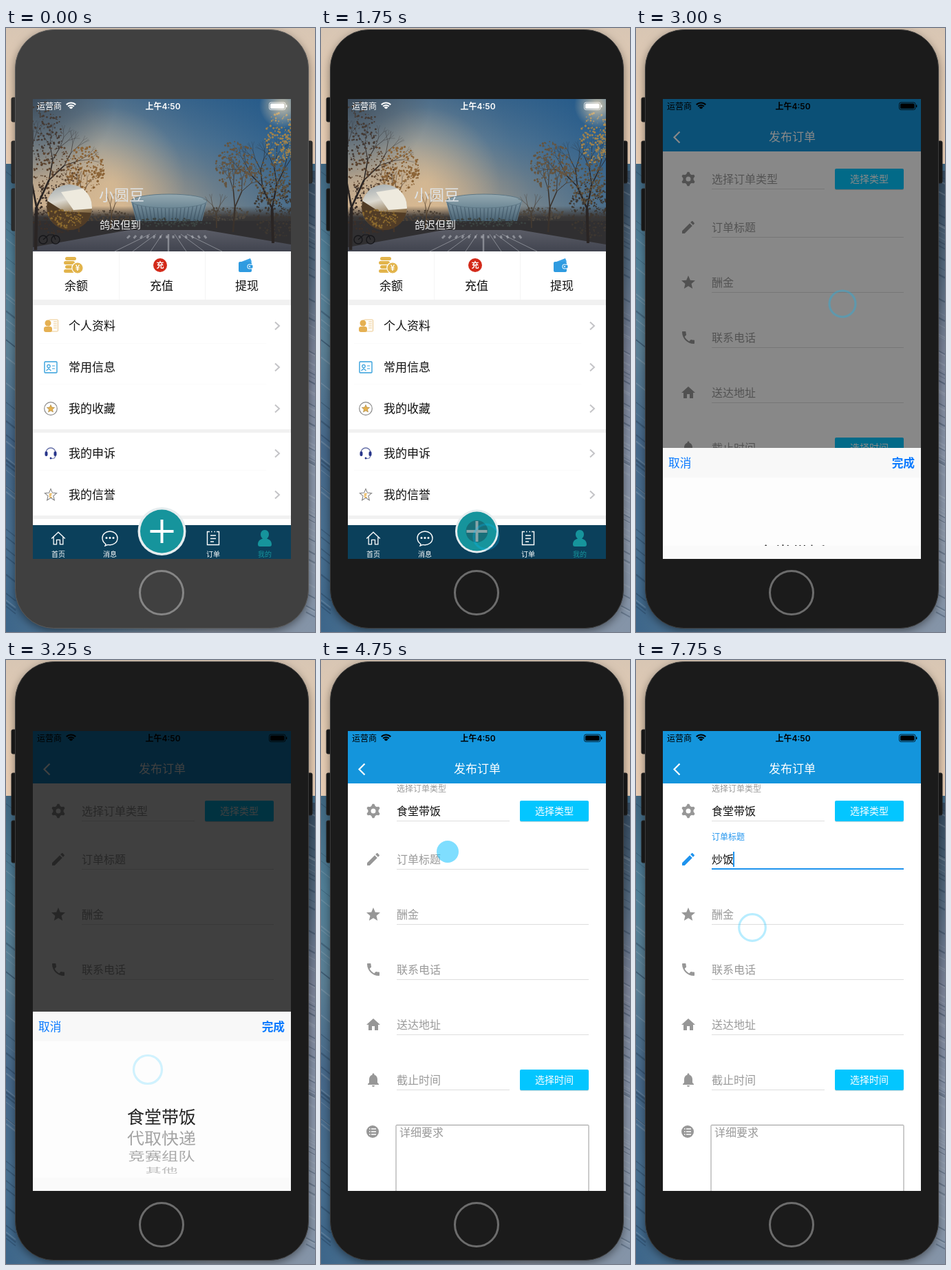
These frames come from a looping animation (449 by 876 pixels, 8 s). An HTML page with a canvas:

```html
<!DOCTYPE html>
<html lang="zh">
<head>
<meta charset="utf-8">
<style>
html, body { margin: 0; width: 100%; height: 100%; overflow: hidden; background: #476e86; }
canvas { display: block; }
</style>
</head>
<body>
<canvas id="stage" width="449" height="876"></canvas>
<script>
const ctx = document.getElementById('stage').getContext('2d');
const LOOP = 8000, STEP = 250;
const CJK = '"Noto Sans CJK SC", "Noto Sans CJK", sans-serif';
const LATIN = 'Inter, ' + CJK;
const SCREEN = [39, 103, 375, 667];
const TEAL = '#16949c', GREY = '#979797', BLUE = '#1e93ee', LINK = '#0a7aff';

// ---------- helpers ----------
function rect(x, y, w, h, fill) { ctx.fillStyle = fill; ctx.fillRect(x, y, w, h); }

function round(x, y, w, h, r, fill, stroke, lw = 1) {
  ctx.beginPath();
  ctx.roundRect(x, y, w, h, r);
  paint(fill, stroke, lw);
}

function paint(fill, stroke, lw = 1) {
  if (fill) { ctx.fillStyle = fill; ctx.fill(); }
  if (stroke) { ctx.strokeStyle = stroke; ctx.lineWidth = lw; ctx.stroke(); }
}

function disc(x, y, r, fill, stroke, lw) {
  ctx.beginPath();
  ctx.arc(x, y, r, 0, Math.PI * 2);
  paint(fill, stroke, lw);
}

function line(pts, color, lw = 1) {
  ctx.beginPath();
  for (let i = 0; i < pts.length; i += 2) ctx.lineTo(pts[i], pts[i + 1]);
  paint(null, color, lw);
}

function poly(pts, fill) {
  ctx.beginPath();
  for (let i = 0; i < pts.length; i += 2) ctx.lineTo(pts[i], pts[i + 1]);
  ctx.closePath();
  paint(fill);
}

// y is the vertical middle of the glyphs
function text(s, x, y, size, color, { align = 'left', weight = 400, family = CJK } = {}) {
  ctx.font = `${weight} ${size}px ${family}`;
  ctx.textAlign = align;
  ctx.fillStyle = color;
  ctx.fillText(s, x, y + size * 0.38);
}

function shape(d, x, y, fill, stroke, lw, scale = 1) {
  ctx.save();
  ctx.translate(x - 12 * scale, y - 12 * scale);
  ctx.scale(scale, scale);
  const p = new Path2D(d);
  if (fill) { ctx.fillStyle = fill; ctx.fill(p, 'evenodd'); }
  if (stroke) { ctx.strokeStyle = stroke; ctx.lineWidth = lw / scale; ctx.stroke(p); }
  ctx.restore();
}

function gradient(x0, y0, x1, y1, ...colors) {
  const g = ctx.createLinearGradient(x0, y0, x1, y1);
  colors.forEach((c, i) => g.addColorStop(i / (colors.length - 1), c));
  return g;
}

function glow(x, y, r, rgb, a) {
  const g = ctx.createRadialGradient(x, y, 0, x, y, r);
  g.addColorStop(0, `rgba(${rgb},${a})`);
  g.addColorStop(1, `rgba(${rgb},0)`);
  rect(x - r, y - r, 2 * r, 2 * r, g);
}

function random(seed) {
  return () => (seed = (seed * 16807) % 2147483647) / 2147483647;
}

const ICON = {
  pencil: 'M3 17.25V21h3.75L17.81 9.94l-3.75-3.75zM20.71 7.04c.39-.39.39-1.02 0-1.41l-2.34-2.34c-.39-.39-1.02-.39-1.41 0l-1.83 1.83 3.75 3.75z',
  star: 'M12 17.27L18.18 21l-1.64-7.03L22 9.24l-7.19-.61L12 2 9.19 8.63 2 9.24l5.46 4.73L5.82 21z',
  phone: 'M6.62 10.79c1.44 2.83 3.76 5.14 6.59 6.59l2.2-2.2c.27-.27.67-.36 1.02-.24 1.12.37 2.33.57 3.57.57.55 0 1 .45 1 1V20c0 .55-.45 1-1 1C10.61 21 3 13.39 3 4c0-.55.45-1 1-1h3.5c.55 0 1 .45 1 1 0 1.25.2 2.45.57 3.57.11.35.03.74-.25 1.02z',
  home: 'M10 20v-6h4v6h5v-8h3L12 3 2 12h3v8z',
  bell: 'M12 22c1.1 0 2-.9 2-2h-4c0 1.1.9 2 2 2zm6-6v-5c0-3.07-1.64-5.64-4.5-6.32V4c0-.83-.67-1.5-1.5-1.5s-1.5.67-1.5 1.5v.68C7.63 5.36 6 7.92 6 11v5l-2 2v1h16v-1z',
  house: 'M2 12.5L12 3l10 9.5M5 10v11h4.5v-6.5h5V21H19V10',
  bubble: 'M6 20.5L5 23l4-1.6C17 23 23 18 23 12 23 6 18 2 12 2S1 6 1 11.5c0 4 2 7 5 9z',
  sheet: 'M7 2.5H3.5v19h17v-19H17M9 2.5h1.5M13.5 2.5H15M8 8h8M8 12.5h8M8 17h5',
  person: 'M12 0C8 0 6 3 6 6.5c0 3 1.5 5 3 6C4 14 2 17 2 21c0 2 1 3 3 3h14c2 0 3-1 3-3 0-4-2-7-7-8.5 1.5-1 3-3 3-6C18 3 16 0 12 0z'
};

function gear(x, y, color) {
  ctx.beginPath();
  for (let i = 0; i < 24; i++) {
    const a = (i - 0.5) / 24 * Math.PI * 2 + Math.PI / 6;
    const r = i % 4 < 2 ? 10.3 : 7.6;
    ctx.lineTo(x + r * Math.cos(a), y + r * Math.sin(a));
  }
  ctx.closePath();
  ctx.moveTo(x + 3.5, y);
  ctx.arc(x, y, 3.5, 0, Math.PI * 2, true);
  ctx.fillStyle = color;
  ctx.fill('evenodd');
}

// ---------- surroundings ----------
function wallpaper() {
  rect(0, 0, 449, 198, gradient(0, 0, 0, 198, '#d8c6b4', '#e3cbb2', '#e9cdb4'));
  rect(0, 197, 449, 679, gradient(0, 197, 0, 876, '#3f6681', '#517f97', '#5b7f95', '#46688a', '#486f90', '#3d668a'));
  rect(432, 207, 17, 669, gradient(0, 207, 0, 876, '#34495e', '#52687d', '#7c8499', '#8894a9', '#8e9aac', '#8494a8'));
  rect(0, 840, 449, 36, gradient(0, 0, 449, 0, 'rgba(61,102,138,1)', '#5f7e98', '#8a94a2', '#8494a8'));
  const rnd = random(77);
  for (let i = 0; i < 110; i++) {
    const y = 208 + rnd() * 640, w = 0.8 + rnd() * 1.6;
    const c = rnd() < 0.5 ? 'rgba(24,44,66,.3)' : 'rgba(185,195,205,.22)';
    if (i % 3) line([436, y, 449, y + 7], c, w);
    else line([0, y, 14, y + 11], c, w);
  }
}

function phone(active) {
  const side = active ? '#161616' : '#2b2b2b';
  const body = active ? '#1b1b1b' : '#404040';
  ctx.save();
  ctx.shadowColor = 'rgba(0,0,0,.5)';
  ctx.shadowBlur = 14;
  ctx.shadowOffsetY = 4;
  round(14, 3, 425, 867, 56, body);
  ctx.restore();
  for (const [y, h] of [[101, 35], [164, 61], [233, 61]]) round(8, y, 8, h, 2, side, '#222');
  round(437, 164, 8, 61, 2, side, '#222');
  round(13.5, 2.5, 426, 868, 56, body, active ? '#3c3c3c' : '#5a5a5a');
  disc(226, 819, 31.5, null, active ? '#6c6c6c' : '#858585', 3);
}

function statusBar(color) {
  text('运营商', 45, 113, 12, color);
  text('上午4:50', 228, 113, 12, color, { align: 'center', weight: 600, family: LATIN });
  [3, 6.5, 10].forEach((r, i) => {
    ctx.beginPath();
    ctx.arc(94.5, 118, r - 0.5, -Math.PI * 0.75, -Math.PI * 0.25);
    paint(null, color, i ? 2.2 : 3);
  });
  round(382.5, 108, 23.5, 10.5, 2.5, null, color, 0.8);
  round(384, 109.5, 20.5, 7.5, 1.5, color);
  rect(407, 111.5, 1.3, 3.5, color);
}

// ---------- home page ----------
function branch(x, y, a, len, w, rnd, color) {
  const x2 = x + Math.cos(a) * len, y2 = y + Math.sin(a) * len;
  line([x, y, x2, y2], color, w);
  if (len < 8) return;
  branch(x2, y2, a - 0.1 - rnd() * 0.35, len * 0.7, w * 0.6, rnd, color);
  branch(x2, y2, a + 0.1 + rnd() * 0.35, len * 0.7, w * 0.6, rnd, color);
}

function leaves(x, y, rx, ry, n, color, rnd) {
  for (let i = 0; i < n; i++) {
    const a = rnd() * 7, d = Math.sqrt(rnd());
    disc(x + Math.cos(a) * rx * d, y + Math.sin(a) * ry * d, 0.5 + rnd() * 1.2, color);
  }
}

function sky() {
  rect(39, 103, 375, 221, gradient(0, 103, 0, 285, '#56728a', '#7f8e97', '#b9a58c', '#d9b78f'));
  rect(39, 103, 375, 221, gradient(150, 200, 400, 110, 'rgba(24,84,138,0)', 'rgba(24,84,138,.5)', 'rgba(24,84,138,.8)'));
  glow(150, 225, 110, '232,198,152', 0.55);
  glow(39, 103, 120, '44,52,62', 0.6);
}

function stadium() {
  poly([182, 252, 292, 252, 284, 284, 190, 284], gradient(0, 250, 0, 284, '#809aa8', '#435c6c'));
  for (let i = 0; i < 19; i++) line([184 + i * 5.9, 254, 192 + i * 5, 282], 'rgba(45,66,82,.5)', 1.2);
  ctx.beginPath();
  ctx.ellipse(237, 251, 55, 10, 0, 0, Math.PI * 2);
  paint(gradient(0, 241, 0, 261, '#95a9b1', '#6d8896'), '#5d7785', 1);
}

function street(rnd) {
  rect(39, 258, 375, 34, gradient(0, 258, 0, 290, 'rgba(62,58,56,0)', '#3a3838', '#2d2e30'));
  leaves(320, 270, 34, 10, 140, '#4d473f', rnd);
  leaves(145, 276, 40, 12, 140, '#4c4136', rnd);
  stadium();
  rect(39, 280, 375, 44, '#302f31');
  leaves(237, 282, 62, 6, 120, '#3c4442', rnd);
  poly([178, 293, 290, 293, 414, 314, 414, 324, 39, 324, 39, 318], gradient(0, 293, 0, 324, '#5a5c66', '#41444f'));
  for (let i = -3; i <= 3; i++) line([236 + i * 9, 299, 236 + i * 26, 324], 'rgba(225,228,232,.4)', i ? 1 : 2.5);
  for (let i = 0; i < 13; i++) line([180 + i * 9, 301, 176 + i * 9.6, 305], 'rgba(225,228,232,.4)', 3);
}

function trees(rnd) {
  const bark = '#2a2524';
  leaves(70, 262, 48, 36, 330, '#3c3029', rnd);
  leaves(395, 262, 36, 42, 300, '#3d3731', rnd);
  branch(43, 322, -1.55, 62, 4.5, rnd, bark);
  branch(106, 296, -1.6, 32, 2.4, rnd, '#453529');
  branch(152, 290, -1.5, 20, 1.6, rnd, '#54422f');
  branch(388, 312, -1.6, 50, 4, rnd, bark);
  branch(330, 296, -1.5, 36, 2.6, rnd, '#3a322c');
  branch(306, 290, -1.6, 20, 1.6, rnd, '#463b30');
  leaves(56, 150, 26, 46, 150, '#443a34', rnd);
  leaves(72, 205, 34, 34, 160, '#5b432f', rnd);
  leaves(115, 205, 28, 34, 230, '#8b6336', rnd);
  leaves(335, 200, 30, 36, 260, '#65543f', rnd);
  leaves(398, 160, 22, 38, 220, '#a3834a', rnd);
  leaves(388, 220, 26, 34, 200, '#5c4f3c', rnd);
}

function avatar(rnd) {
  ctx.beginPath();
  ctx.arc(92, 260, 33, 0, Math.PI * 2);
  ctx.clip();
  rect(59, 227, 66, 66, gradient(80, 227, 96, 293, '#a7afb2', '#dcd9d0', '#8f7550', '#493622'));
  poly([80, 238, 125, 231, 125, 262, 98, 264], '#eeeade');
  poly([59, 250, 84, 266, 125, 268, 125, 293, 59, 293], '#513c26');
  leaves(84, 276, 28, 14, 110, '#8a692f', rnd);
}

function photo() {
  const rnd = random(4242);
  ctx.save();
  ctx.beginPath();
  ctx.rect(39, 103, 375, 221);
  ctx.clip();
  sky();
  street(rnd);
  trees(rnd);
  for (const x of [54, 72]) disc(x, 307, 6, null, '#17171a', 1.4);
  line([54, 307, 62, 300, 69, 300, 72, 307], '#17171a', 1.2);
  glow(402, 112, 34, '255,226,180', 0.75);
  avatar(rnd);
  ctx.restore();
  text('小圆豆', 135, 242, 22, '#dfe3e6');
  text('鸽迟但到', 136, 285, 15, '#f1f1f1');
}

function coins(x, y) {
  for (let i = 0; i < 4; i++) round(x - (i % 2 ? 14 : 12), y - 12 + i * 6, 16, 5, 2.5, '#e2b44c');
  disc(x + 6, y + 4, 8.2, '#e2b44c', '#fff', 1.2);
  text('¥', x + 6, y + 4, 11, '#fff', { align: 'center', weight: 700 });
}

function wallet(x, y) {
  poly([x - 6, y - 5, x + 7, y - 10, x + 9, y - 5], '#3aa2e6');
  round(x - 10, y - 5, 19, 15, 2, '#2f9be0');
  round(x + 3, y - 1, 8, 6, 2, '#2f9be0', '#fff', 1);
  disc(x + 6, y + 2, 1, '#fff');
}

const MENU = [
  ['个人资料', 432, y => {
    round(62.5, y - 9, 13, 17, 1, null, '#ecc98c');
    for (let i = -1; i < 3; i++) line([69, y - 3 + i * 3, 74, y - 3 + i * 3], '#ecc98c');
    disc(61, y - 4, 4.5, '#e5b052');
    round(55, y + 1, 12, 8, 3, '#e5b052');
  }],
  ['常用信息', 492, y => {
    round(56, y - 8, 18, 16, 1, null, '#35a0dc', 1.4);
    disc(62, y - 1.5, 2.2, null, '#35a0dc', 1.2);
    line([58.5, y + 5, 62, y + 2, 65.5, y + 5], '#35a0dc', 1.2);
    line([67, y - 2, 71, y - 2], '#35a0dc');
    line([67, y + 2, 71, y + 2], '#35a0dc');
  }],
  ['我的收藏', 552, y => {
    disc(65, y, 9.3, null, '#8a8a8a', 1.2);
    shape(ICON.star, 65, y, '#e5b04c', '#a08040', 0.6, 0.56);
  }],
  ['我的申诉', 617, y => {
    ctx.beginPath();
    ctx.arc(65, y - 1, 7, Math.PI, 0);
    paint(null, '#6670a8', 1.3);
    round(56.5, y - 3, 4, 7, 2, '#26348a');
    round(69.5, y - 3, 4, 7, 2, '#26348a');
    line([72, y + 4, 70, y + 7, 66, y + 7.5], '#6670a8', 1.2);
    disc(65, y + 7, 1.4, '#26348a');
  }],
  ['我的信誉', 677, y => {
    shape(ICON.star, 65, y, null, '#858585', 1.1, 0.86);
    text('E', 65, y + 1, 8, '#e5a530', { align: 'center', weight: 700 });
  }]
];

function plusButton(pressed) {
  disc(226.5, 730, pressed ? 31.5 : 35, '#e6edef');
  disc(226.5, 730, pressed ? 28.5 : 31.5, TEAL);
  if (pressed) disc(226.5, 730, 16, '#176f79');
  const c = pressed ? '#87a5a9' : '#fff', r = pressed ? 15 : 17;
  line([226.5 - r, 730, 226.5 + r, 730], c, 4);
  line([226.5, 730 - r, 226.5, 730 + r], c, 4);
}

function homePage(pressed) {
  rect(...SCREEN, '#fff');
  photo();
  rect(164, 324, 1, 70, '#f4f4f4');
  rect(289, 324, 1, 70, '#f4f4f4');
  coins(98, 344);
  disc(224, 344, 10, '#d32a1a');
  text('充', 224, 344, 11, '#fff', { align: 'center', weight: 700 });
  wallet(348, 344);
  ['余额', '充值', '提现'].forEach((s, i) => text(s, 102 + i * 124, 374, 17, '#111', { align: 'center' }));
  for (const [y, h] of [[394, 8], [582, 5], [707, 5]]) rect(39, y, 375, h, '#f1f1f1');
  for (const y of [457, 516, 641]) rect(48, y, 330, 1, '#fbfbfb');
  for (const [label, y, icon] of MENU) {
    icon(y);
    text(label, 91, y, 17, '#111');
    line([391, y - 5.5, 397, y, 391, y + 5.5], '#c4c4c7', 2);
  }
  rect(39, 721, 375, 49, '#0b405b');
  shape(ICON.house, 76, 740, null, '#fff', 1.3, 0.98);
  shape(ICON.bubble, 151, 740, null, '#fff', 1.4);
  for (const x of [146, 151, 156]) disc(x, 739.5, 1.5, '#fff');
  shape(ICON.sheet, 301, 740, null, '#fff', 1.4);
  shape(ICON.person, 376, 740, TEAL);
  ['首页', '消息', '', '订单', '我的'].forEach((s, i) =>
    text(s, 76 + i * 75, 763, 10, i === 4 ? TEAL : '#fff', { align: 'center' }));
  plusButton(pressed);
  statusBar('#fff');
}

// ---------- order form ----------
const FIELDS = [
  ['选择订单类型', 219, '选择类型'], ['订单标题', 289], ['酬金', 369],
  ['联系电话', 449], ['送达地址', 529], ['截止时间', 609, '选择时间']
];
const FIELD_ICONS = ['', 'pencil', 'star', 'phone', 'home', 'bell'];

function field([label, y, button], i, t) {
  const focus = i === 1 && t >= 5000;
  if (i) shape(ICON[FIELD_ICONS[i]], 76, y, focus ? BLUE : GREY);
  else gear(76, y, GREY);
  const right = button ? 274 : 389;
  rect(110, y + 14, right - 110, 1, '#dedede');
  if (focus) rect(110, y + 13, right - 110, 2, BLUE);
  const filled = i === 0 && t >= 4250;
  const up = filled ? 1 : focus ? Math.min(1, (t - 4750) / 400) : 0;
  text(label, 110, y - 33 * up, 16 - 4 * up, focus ? BLUE : '#9a9a9a');
  if (filled) text('食堂带饭', 110, y, 16, '#111');
  if (button) {
    round(289, y - 14, 100, 30, 2, 'rgba(0,0,0,.15)');
    round(289, y - 15, 100, 30, 2, '#03c6ff');
    text(button, 339, y, 14, '#fff', { align: 'center' });
  }
}

const CANDIDATES = { ch: '吃 出 成 车', chao: '吵 超 朝 炒', chaofan: '炒饭 超凡 吵翻' };

function titleInput(t) {
  if (t < 5000) return;
  const typing = t < 5750 ? '' : t < 6000 ? 'ch' : t < 6250 ? 'chao' : t < 6500 ? 'chaofan' : '';
  const value = typing || (t >= 6500 ? '炒饭' : '');
  ctx.font = `16px ${typing ? 'Roboto, sans-serif' : CJK}`;
  const w = ctx.measureText(value).width;
  if (typing) rect(110, 278, w, 22, '#c3d8ee');
  text(value, 110, 289, 16, '#111', typing ? { family: 'Roboto, sans-serif' } : {});
  rect(110 + w - (w ? 1 : 0), 278, 2, 22, BLUE);
  if (!typing) return;
  rect(100, 300, 312, 41, '#fff');
  let x = 100;
  CANDIDATES[typing].split(' ').forEach((word, i) => {
    const cell = 47.5 + word.length * 20;
    if (!i) rect(x, 300, cell, 41, '#eaeaea');
    text(i + 1, x + 17, 320, 14, '#a0a0a0', { family: LATIN });
    text(word, x + 29.5, 320, 20, '#000');
    x += cell;
  });
  line([388, 318.5, 391, 321.5, 394, 318.5], '#222', 1.5);
  round(100.5, 300.5, 311, 40, 0, null, '#bdbdbd');
}

function formPage(t) {
  const dy = t < 2500 ? 8 : 0;
  rect(...SCREEN, '#fff');
  ctx.save();
  ctx.translate(0, dy);
  FIELDS.forEach((f, i) => field(f, i, t));
  disc(75, 684, 9, GREY);
  for (const y of [680, 684, 688]) {
    rect(70, y - 0.7, 1.6, 1.5, '#fff');
    rect(73, y - 0.7, 7, 1.5, '#fff');
  }
  round(109, 674.5, 280, 120, 1, null, '#999', 1);
  text('详细要求', 114, 685, 16, '#9a9a9a');
  titleInput(t);
  rect(39, 95, 375, 84, '#1495dc');
  line([63.5, 150.5, 55.5, 158.5, 63.5, 166.5], '#fff', 2.2);
  text('发布订单', 227, 158, 17, '#fff', { align: 'center' });
  ctx.restore();
  statusBar('#000');
}

// ---------- picker ----------
const OPTIONS = [
  ['食堂带饭', 662, 25, 1, '#222'], ['代取快递', 693, 25, 0.9, '#a3a3a3'],
  ['竞赛组队', 720, 24.3, 0.7, '#a9a9a9'], ['其他', 740, 23.5, 0.42, '#bcbcbc']
];

function picker(open, t) {
  if (!open) return;
  rect(...SCREEN, `rgba(0,0,0,${0.75 * open})`);
  ctx.save();
  ctx.translate(0, Math.round(260 * (1 - open)));
  rect(39, 510, 375, 260, '#fdfdfd');
  rect(39, 510, 375, 43, t < 4000 ? '#f8f8f8' : '#eaf0f8');
  text('取消', 47, 532, 16.7, LINK);
  text('完成', 405, 532, 16.7, t < 4000 ? LINK : '#78b5fb', { align: 'right', weight: 700 });
  for (const [s, y, size, squash, color] of OPTIONS) {
    ctx.save();
    ctx.translate(226, y);
    ctx.scale(1, squash);
    text(s, 0, 0, size, color, { align: 'center' });
    ctx.restore();
  }
  ctx.restore();
  rect(39, 751, 375, 19, '#fafafa');
}

function pickerOpen(t) {
  if (t < 3000 || t >= 4500) return 0;
  return t < 3250 ? 0.62 : t < 4250 ? 1 : 134 / 260;
}

// ---------- touch marker: time, x, y, radius, opacity, pressed ----------
const TOUCH = [
  [1000, 300, 610, 20, 0.3, 0], [1500, 228, 731, 16, 0.5, 1], [1750, 240, 738, 18, 0.25, 0],
  [2250, 198, 356, 21.5, 0.1, 0], [2500, 300, 238, 20, 0.3, 0], [2750, 338, 222, 16, 0.5, 1],
  [3000, 300, 400, 19, 0.3, 0], [3250, 206, 594, 20.5, 0.18, 0], [3750, 372, 540, 20, 0.3, 0],
  [4000, 388, 533, 16, 0.5, 1], [4250, 226, 348, 19.5, 0.4, 0], [4500, 186, 282, 19, 0.35, 0],
  [4750, 184, 278, 16, 0.5, 1], [6750, 184, 278, 16, 0.5, 1], [7000, 184, 282, 18, 0.4, 0],
  [7750, 169, 388, 19.3, 0.28, 0]
];

function touch(t) {
  const i = TOUCH.findLastIndex(k => k[0] <= t);
  if (i < 0) return;
  const a = TOUCH[i], b = TOUCH[i + 1] || a;
  const p = b === a ? 0 : (t - a[0]) / (b[0] - a[0]);
  const [, x, y, r, alpha] = a.map((v, k) => v + (b[k] - v) * p);
  const color = `rgba(0,190,255,${alpha})`;
  if (a[5]) disc(x, y, r, color);
  else disc(x, y, r, null, color, 3.2);
}

function draw(t) {
  wallpaper();
  phone(t >= 750);
  ctx.save();
  ctx.beginPath();
  ctx.rect(...SCREEN);
  ctx.clip();
  if (t < 2250) homePage(t === 1750);
  if (t >= 2000) {
    ctx.save();
    if (t < 2250) ctx.translate(110, 0);
    formPage(t);
    ctx.restore();
  }
  picker(pickerOpen(t), t);
  touch(t);
  ctx.restore();
}

let shown = -1;
const start = performance.now();
function tick() {
  const t = Math.floor((performance.now() - start) % LOOP / STEP) * STEP;
  if (t !== shown) draw(shown = t);
  requestAnimationFrame(tick);
}
tick();
</script>
</body>
</html>
```
